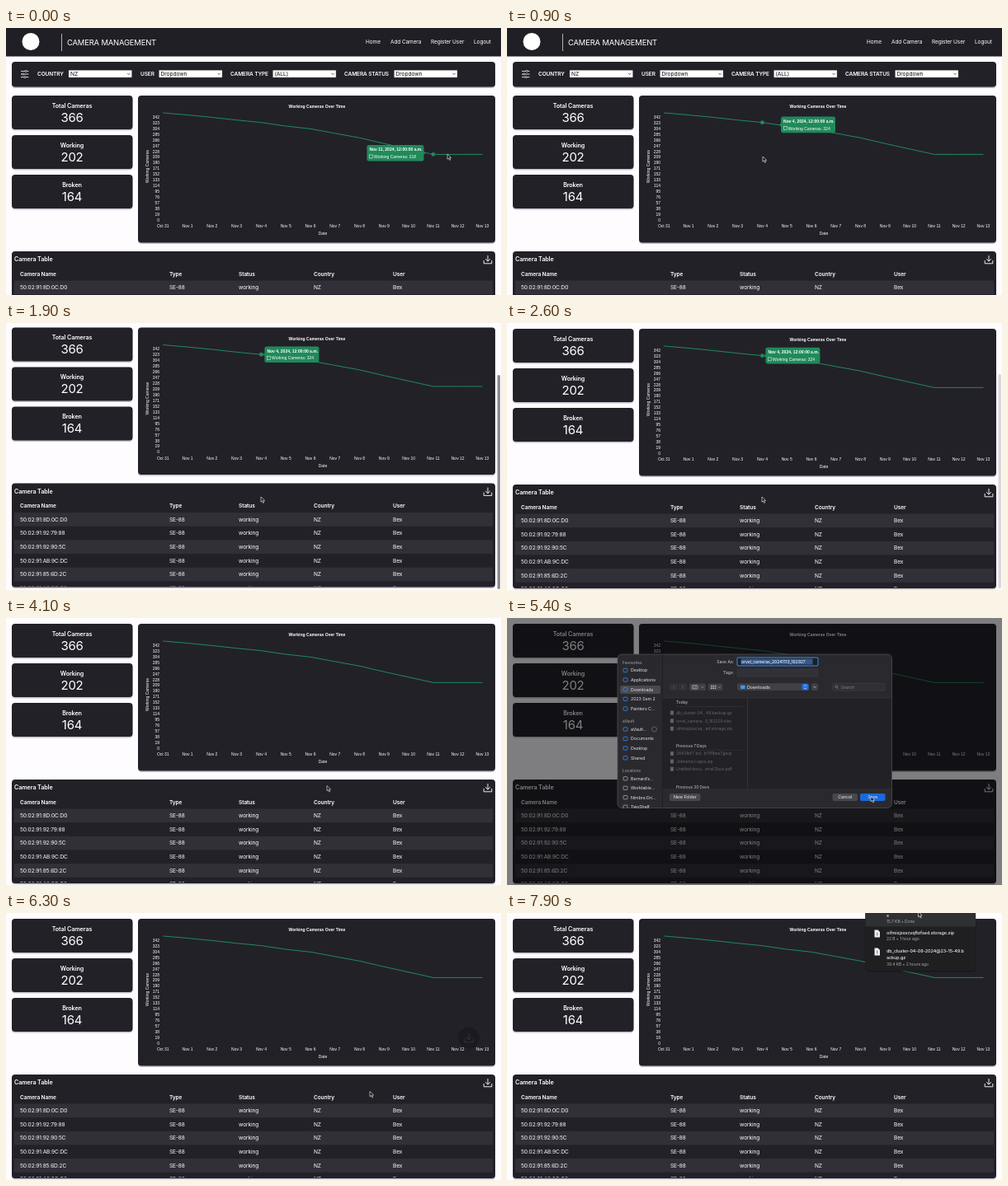
These frames come from a looping animation (600 px wide and 324 px high, 8 s). An HTML page:

```html
<!DOCTYPE html>
<html lang="en">
<head>
<meta charset="utf-8">
<title>Camera management</title>
<style>
  html, body { margin: 0; width: 100%; height: 100%; overflow: hidden; background: #fefcff; }
  svg { display: block; width: 600px; height: 324px; }
  text { font-family: Inter, "Open Sans", sans-serif; letter-spacing: -.015em; white-space: pre; }
  .chart text { font-family: "Liberation Sans", Arial, sans-serif; letter-spacing: 0; }
</style>
</head>
<body>
<svg id="stage" viewBox="0 0 600 324" xmlns="http://www.w3.org/2000/svg"></svg>
<script>
const LOOP = 8000, STEP = 100;
const CARD = '#222128', GREEN = '#208a5a';

// --- drawing helpers -------------------------------------------------
const rect = (x, y, x2, y2, fill, r = 0, extra = '') =>
  `<rect x="${x}" y="${y}" width="${x2 - x}" height="${y2 - y}" rx="${r}" fill="${fill}" ${extra}/>`;
const path = (d, stroke, w = 1, extra = '') =>
  `<path d="${d}" fill="none" stroke="${stroke}" stroke-width="${w}" ${extra}/>`;
const text = (x, cy, str, size, { fill = '#fff', weight = 400, anchor = 'start', extra = '' } = {}) =>
  `<text x="${x}" y="${cy + size * .36}" font-size="${size}" font-weight="${weight}" fill="${fill}" text-anchor="${anchor}" ${extra}>${str}</text>`;
const group = (id, body, extra = '') => `<g id="${id}" ${extra}>${body}</g>`;
const card = (x, y, x2, y2) =>
  rect(x, y + 1.2, x2, y2 + 1.4, 'rgba(60,45,85,.28)', 4) + rect(x, y, x2, y2, CARD, 4);
const BOLD = { weight: 600 };

// --- page ------------------------------------------------------------
function header() {
  const nav = [[436, 'Home'], [466, 'Add Camera'], [515, 'Register User'], [567, 'Logout']];
  return rect(0, -40, 600, 34.5, '#211f26') +
    '<circle cx="30" cy="16.5" r="10.5" fill="#fff"/>' +
    path('M67.5 7V28', '#d8d8da', .8) +
    text(74, 17.3, 'CAMERA MANAGEMENT', 9.4) +
    nav.map(([x, s]) => text(x, 17, s, 6.5)).join('');
}

function filters() {
  const items = [
    [38, 'COUNTRY', 76, 'NZ'], [163, 'USER', 185.5, 'Dropdown'],
    [272, 'CAMERA TYPE', 323.5, '(ALL)'], [410, 'CAMERA STATUS', 470.5, 'Dropdown']];
  const sliders = [52.4, 56, 59.6].map((y, i) => {
    const k = [24, 20.5, 23][i];
    return path(`M18 ${y}H27.4`, '#fff', .8) + `<circle cx="${k}" cy="${y}" r="1.1" fill="${CARD}" stroke="#fff" stroke-width=".6"/>`;
  }).join('');
  return card(7, 41, 593, 71.5) + sliders + items.map(([lx, label, x, value]) =>
    text(lx, 56, label, 6.5, BOLD) +
    rect(x, 51.3, x + 76.5, 60, '#fff', .4, 'stroke="#777" stroke-width=".4"') +
    text(x + 2, 55.8, value, 6.7, { fill: '#111' }) +
    path(`M${x + 71} 54.8l1.6 1.7l1.6-1.7`, '#222', .7)).join('');
}

function stats() {
  return [['Total Cameras', 366], ['Working', 202], ['Broken', 164]].map(([label, n], i) => {
    const y = 82 + i * 48;
    return card(7, y, 153.5, y + 41) +
      text(80, y + 12, label, 7.2, { weight: 600, anchor: 'middle' }) +
      text(80, y + 26.3, n, 15, { anchor: 'middle' });
  }).join('');
}

const DAYS = ['Oct 31', ...Array.from({ length: 13 }, (_, i) => 'Nov ' + (i + 1))];
const VALUES = [356, 349, 341, 332, 324, 312, 303, 288, 273, 254, 236, 218, 218, 218];
const dayX = i => 190.3 + i * 29.78;
const valueY = v => 233 - v * 6.94 / 19;

function chart() {
  let s = card(160, 82, 593, 260.5) +
    text(377, 95.3, 'Working Cameras Over Time', 5.05, { weight: 700, anchor: 'middle' });
  for (let v = 0; v <= 342; v += 19) s += text(186, valueY(v), v, 5, { anchor: 'end' });
  s += DAYS.map((d, i) => text(dayX(i), 240.2, d, 5, { anchor: 'middle' })).join('');
  s += text(384, 249.4, 'Date', 5, { anchor: 'middle' });
  s += text(0, 0, 'Working Cameras', 5, { anchor: 'middle', extra: 'transform="translate(171.5 168) rotate(-90)"' });
  s += path('M' + VALUES.map((v, i) => `${dayX(i)} ${valueY(v)}`).join('L'), GREEN, 1);
  const tip = `<circle id="dot" r="2.4" fill="${GREEN}"/>` + group('tip',
    `<path id="caret" fill="${GREEN}"/><rect id="tipBox" y="-9.8" height="19.6" rx="2.4" fill="${GREEN}"/>` +
    text(3, -4.4, '', 5, { weight: 700, extra: 'id="tipDay"' }) +
    rect(3.2, 2.2, 7.2, 6.2, GREEN, 0, 'stroke="#fff" stroke-width=".5"') +
    text(8.6, 4.4, '', 5, { extra: 'id="tipValue"' }));
  return group('chart', s + group('hover', tip), 'class="chart"');
}

const downloadIcon = (x, y, c, k = 1) =>
  path('M0-5V2M-2.8-.8L0 2.2L2.8-.8M-4.8 1V4.8H4.8V1', c, .9, `transform="translate(${x} ${y}) scale(${k})"`);

function table() {
  const cols = [17, 198, 282, 373, 469];
  const ids = ['8D:0C:D0', '92:79:88', '92:90:5C', 'AB:9C:DC', '85:6D:2C', 'A8:9C:C0'];
  const line = (cells, y, opt) => cells.map((c, i) => text(cols[i], y, c, 6.55, opt)).join('');
  const rows = ids.map((id, i) => {
    const y = 314.8 + i * 16.65;
    return (i % 2 ? '' : rect(10, y - 8.3, 590, y + 8.3, '#313038')) +
      line(['50:02:91:' + id, 'SE-88', 'working', 'NZ', 'Bex'], y);
  }).join('');
  return card(7, 271, 593, 397) + text(10, 280.8, 'Camera Table', 7.2, BOLD) +
    downloadIcon(584, 281, '#fff') +
    line(['Camera Name', 'Type', 'Status', 'Country', 'User'], 298.3, BOLD) +
    `<g clip-path="url(#rowsClip)">${rows}</g>`;
}

// --- save dialog -----------------------------------------------------
function sidebar() {
  const BLUE = '#2f8df5';
  const heads = [[54, 'Favourites'], [125.7, 'aVault'], [185, 'Locations']];
  const items = [
    [63.5, 'Desktop'], [75, 'Applications'], [86.8, 'Downloads'], [98.3, '2023 Sem 2'], [110, 'Painters C…'],
    [135, 'aVault…'], [146.5, 'Documents'], [158, 'Desktop'], [169.8, 'Shared'],
    [194.8, 'Bernard’s…'], [206.3, 'Worktable…'], [217.7, 'Nimbra Dri…'], [229.3, 'TwoShelf']];
  return rect(137, 82, 186, 92, '#4a494e', 2) +
    heads.map(([y, s]) => text(140, y, s, 4.8, { fill: '#87868b', weight: 600 })).join('') +
    items.map(([y, s], i) => rect(141, y - 2.2, 146, y + 2.2, 'none', 1,
      `stroke="${i > 8 ? '#a5a4a8' : BLUE}" stroke-width=".8"`) + text(150, y, s, 5.3, { fill: '#e4e3e6' })).join('') +
    '<circle cx="178.5" cy="135" r="3" fill="none" stroke="#77767a" stroke-width=".7"/>';
}

function fileList() {
  const dim = { fill: '#68676c' }, head = { fill: '#a09fa4', weight: 600 };
  const heads = [[102.5, 'Today'], [155.2, 'Previous 7 Days'], [204.8, 'Previous 30 Days']];
  const files = [
    [115, 'db_cluster-04…49.backup.gz'], [124.8, 'orvel_camera…3_162229.xlsx'], [134.3, 'oifmixjzsxcvq…ed.storage.zip'],
    [164.6, '28431bf7-bd…b791bee7.jpeg'], [174, 'Jobnerra Logos.zip'], [183.3, 'Untitled docu…erral Docs.pdf']];
  return `<g clip-path="url(#listClip)">` +
    heads.map(([y, s]) => text(205, y, s, 4.9, head) + path(`M205 ${y + 5}H286`, '#3a393e', .5)).join('') +
    files.map(([y, s]) => rect(198, y - 2.5, 202, y + 2.5, '#626166', .5) + text(205, y, s, 5, dim)).join('') + '</g>';
}

function dialog() {
  const soft = { fill: '#c9c8cc', anchor: 'end' }, mid = { anchor: 'middle', fill: '#eeedf0' };
  const button = (x, x2, s, fill) => rect(x, 213, x2, 222, fill, 2) + text((x + x2) / 2, 217.5, s, 5.3, mid);
  const chevron = (x, y, c = '#aaa') => path(`M${x - 1.3} ${y - .7}l1.3 1.4l1.3-1.4`, c, .7);
  const frame = rect(134, 44, 466.5, 230.5, '#2a292e', 5, 'stroke="#545358" stroke-width=".7"') +
    path('M188.5 44V230', '#1c1b1f', .7) +
    rect(189, 97, 466, 208, '#222126') + path('M189 97H466M189 208H466', '#3a393e', .5) +
    path('M291.5 97V208', '#3c3b40', .7) +
    text(275, 53, 'Save As:', 5.2, soft) + text(275, 66.5, 'Tags:', 5.2, soft) +
    rect(279, 62, 377, 71, '#323136', 1, 'stroke="#424146" stroke-width=".4"') +
    rect(279, 48, 377, 58, '#1f1e23', 2, 'stroke="#2f6eb5" stroke-width="1.4"');
  const tools = rect(197, 79.5, 207, 88, '#333237', 1.5) + rect(208, 79.5, 218, 88, '#333237', 1.5) +
    path('M203 82l-1.6 1.8l1.6 1.8M212 82l1.6 1.8l-1.6 1.8', '#66656a', .7) +
    rect(221, 79.5, 241, 88, '#403f44', 1.5) + rect(244, 79.5, 261.5, 88, '#403f44', 1.5) +
    rect(224.5, 81.8, 231, 86, 'none', .5, 'stroke="#bbb" stroke-width=".7"') + path('M226.7 82V86M228.9 82V86', '#bbb', .6) +
    [0, 2.4, 4.8].map(d => rect(247 + d, 81.8, 248.6 + d, 83.4, '#bbb') + rect(247 + d, 84.4, 248.6 + d, 86, '#bbb')).join('') +
    chevron(237, 84) + chevron(257.5, 84) +
    rect(279, 79.3, 366, 88, '#414045', 2) + rect(283, 81.8, 288.5, 86, '#3a9bf0', .8) +
    text(291, 83.7, 'Downloads', 5.4, { fill: '#eeedf0' }) +
    rect(357.5, 79.8, 365.5, 87.5, '#1d6be0', 1.6) + path('M360 82.8l1.5-1.6l1.5 1.6M360 84.6l1.5 1.6l1.5-1.6', '#fff', .7) +
    rect(369, 79.3, 377, 88, '#414045', 2) + chevron(373, 83.8, '#ddd') +
    rect(394.5, 79.3, 458, 88, '#302f34', 2, 'stroke="#47464b" stroke-width=".5"') +
    '<circle cx="399.3" cy="83.3" r="1.6" fill="none" stroke="#99989c" stroke-width=".6"/>' + path('M400.5 84.5l1.5 1.5', '#99989c', .6) +
    text(404.5, 83.7, 'Search', 5.2, { fill: '#85848a' });
  const content = rect(283.5, 49.5, 370.5, 56.5, '#35588a') +
    text(284, 53, 'orvel_cameras_20241113_162927', 5.2) + sidebar() + fileList();
  return `<g clip-path="url(#dialogClip)">` + frame + tools + group('content', content) +
    button(197, 234.5, 'New Folder', '#48474c') + button(394.5, 425, 'Cancel', '#48474c') + button(428, 458.5, 'Save', '#1b68dc') + '</g>';
}

// --- downloads popup -------------------------------------------------
function popup() {
  const name = (y, s) => text(460, y, s, 5.45, { weight: 500, fill: '#f0f0f0' });
  const info = (y, s) => text(460, y, s, 5, { fill: '#a9a9ab' });
  const icon = y => `<path d="M445.5 ${y - 4.5}h4l2.5 2.5v6.5h-6.5z" fill="#eee"/>` + path(`M448.7 ${y - 1.5}v4`, '#555', .8);
  return rect(434, -20, 568.5, 71.5, 'rgba(0,0,0,.3)', 5) + rect(434.5, -20, 568, 70, '#1f1f21', 4) +
    group('itemHover', rect(434.5, -20, 568, 16.5, '#2e3032')) +
    name(2.8, 'x') + info(10, '15.7 KB • Done') +
    icon(25) + name(24.3, 'oifmixjzsxcvqftzfsed.storage.zip') + info(31.6, '22 B • 1 hour ago') +
    icon(47) + name(46, 'db_cluster-04-08-2024@23-15-49.b') + name(53.8, 'ackup.gz') + info(61.8, '39.4 KB • 2 hours ago');
}

const clip = (id, shape) => `<clipPath id="${id}">${shape}</clipPath>`;
const stage = document.getElementById('stage');
stage.innerHTML = '<defs>' + clip('rowsClip', rect(7, 300, 593, 396, '#000')) +
  clip('listClip', rect(189, 97, 291, 207, '#000')) + clip('dialogClip', rect(133, 43, 467, 231, '#000', 5)) + '</defs>' +
  rect(0, 0, 600, 324, '#fefcff') +
  group('page', header() + filters() + stats() + chart() + table()) +
  group('scrollbar', rect(595.6, 2, 599, 262, '#8b8a8e', 1.7)) +
  group('shade', rect(0, 0, 600, 324, '#000')) +
  group('dialog', dialog()) +
  group('badge', '<circle r="13" fill="#131217"/>' + downloadIcon(0, 0, '#4b4a52', 1.1)) +
  group('popup', popup()) +
  group('cursor', '<path d="M0 0V6.2L1.5 4.9L2.6 7.4L3.7 6.9L2.6 4.5L4.6 4.4Z" fill="#111" stroke="#fff" stroke-width=".6" stroke-linejoin="round"/>');

// --- motion ----------------------------------------------------------
const $ = id => document.getElementById(id);
const clamp = v => Math.max(0, Math.min(1, v));
const smooth = u => u * u * (3 - 2 * u);
const ramp = (t, a, b) => clamp((t - a) / (b - a));

// keys: [time, value, value...]
function track(keys, t, ease = smooth) {
  let i = 0;
  while (i < keys.length - 2 && t >= keys[i + 1][0]) i++;
  const [a, b] = [keys[i], keys[i + 1]], u = ease(ramp(t, a[0], b[0]));
  return a.slice(1).map((v, k) => v + (b[k + 1] - v) * u);
}

const CURSOR = [
  [-300, 480, 154], [0, 535, 153], [200, 560, 153], [900, 310, 156], [1250, 309, 211], [2800, 309, 211],
  [3300, 580, 203], [3600, 580, 203], [4100, 389, 203.5], [4600, 389, 203.5], [5100, 441, 216.5],
  [6500, 441, 216.5], [7250, 506, 18], [7700, 498.5, -1.5]];
const SCROLL = [
  [1300, 0], [1400, 2.8], [1500, 12], [1600, 32], [1700, 53], [1800, 69], [1900, 76.4], [2050, 76.4], [2400, 75]];

const nearestDay = t => Math.max(0, Math.min(13, Math.round((track(CURSOR, t)[0] - dayX(0)) / 29.78)));

function tipBox(i) {
  const w = i > 9 || !i ? 69 : 66, left = dayX(i) > 384;
  return [left ? dayX(i) - 4 - w : dayX(i) + 4, valueY(VALUES[i]), w];
}

function hover(t) {
  const time = Math.min(t, 1250), i = nearestDay(time - 60);
  const sum = [0, 0, 0];
  for (let k = 0; k < 8; k++) tipBox(nearestDay(time - 60 - k * 18)).forEach((v, n) => sum[n] += v / 8);
  const [x, y] = sum, w = tipBox(i)[2], px = dayX(i), py = valueY(VALUES[i]);
  $('dot').setAttribute('cx', px);
  $('dot').setAttribute('cy', py);
  $('tip').setAttribute('transform', `translate(${x} ${y})`);
  $('tipBox').setAttribute('width', w);
  $('caret').setAttribute('d', px > x + w / 2 ? `M${w} -2.2l2.2 2.2l-2.2 2.2z` : 'M0 -2.2l-2.2 2.2l2.2 2.2z');
  $('tipDay').textContent = `${DAYS[i]}, 2024, 12:00:00 a.m.`;
  $('tipValue').textContent = `Working Cameras: ${VALUES[i]}`;
  show('hover', 1 - ramp(t, 2800, 3000));
}

function show(id, opacity) {
  $(id).style.opacity = opacity;
  $(id).style.display = opacity > 0 ? '' : 'none';
}
const move = (id, x, y) => $(id).setAttribute('transform', `translate(${x} ${y})`);

function draw(t) {
  const [scroll] = track(SCROLL, t, u => u);
  move('page', 0, -scroll);
  move('scrollbar', 0, scroll * .8);
  show('scrollbar', t < 1300 ? 0 : 1 - ramp(t, 2400, 2700));
  hover(t);

  const open = ramp(t, 4150, 4400) * (1 - ramp(t, 5450, 5700));
  show('shade', open * .5);
  show('dialog', open);
  show('content', ramp(t, 4450, 4700));

  const fly = ramp(t, 6150, 7050);
  move('badge', 561, 152 - 135 * Math.max(0, smooth(fly) - .07));
  show('badge', Math.sin(fly * Math.PI) * .9);

  show('popup', ramp(t, 6900, 7100));
  const [cx, cy] = track(CURSOR, t);
  show('itemHover', cy < 16 ? 1 : 0);
  move('cursor', cx, cy);
}

const start = performance.now();
function tick() {
  const t = (performance.now() - start) % LOOP;
  draw(Math.floor(t / STEP) * STEP);
  requestAnimationFrame(tick);
}
draw(0);
requestAnimationFrame(tick);
</script>
</body>
</html>
```
